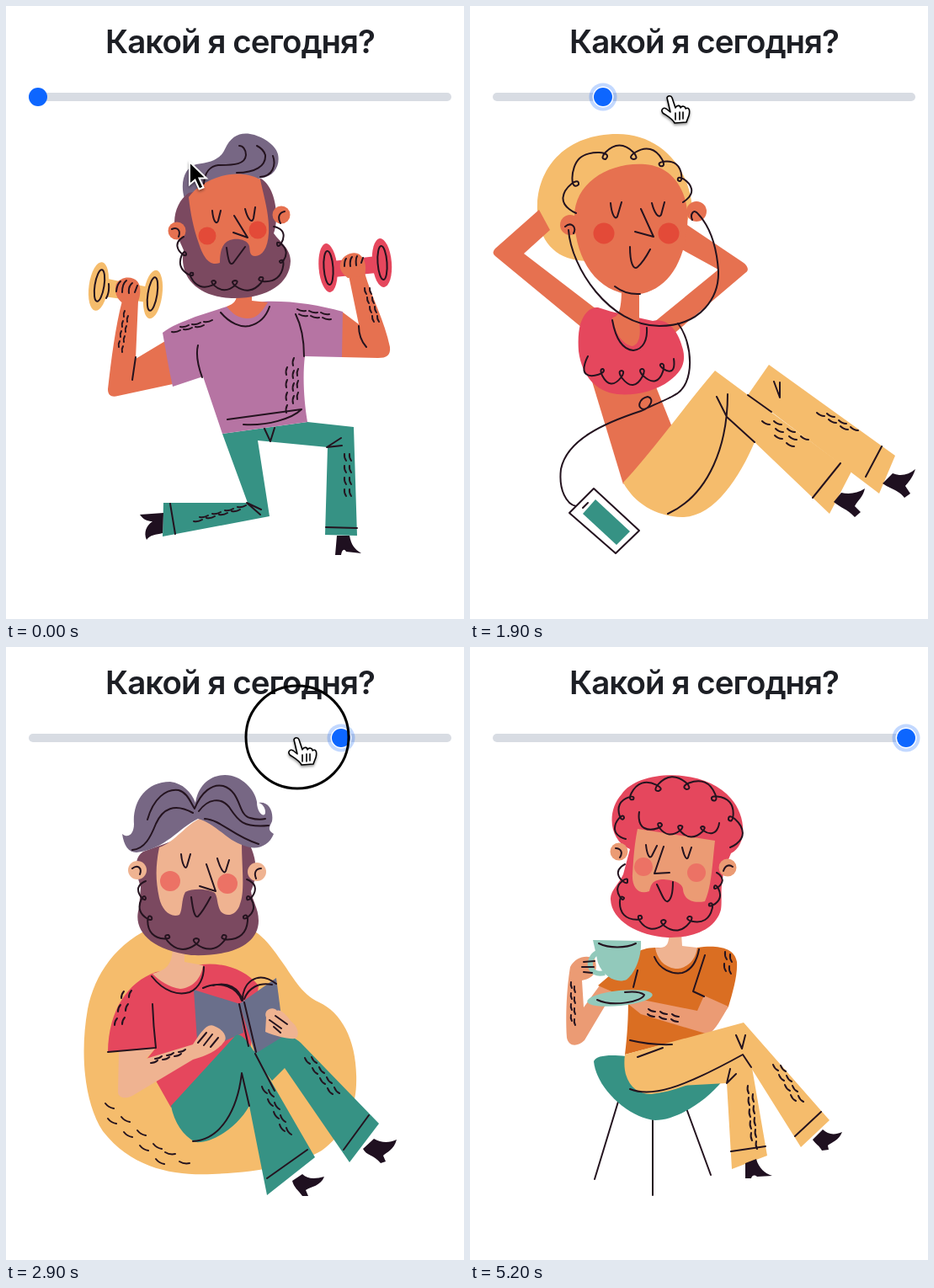
An HTML page that plays this animation: 544x728 px, repeating every 5300 ms.

```html
<!DOCTYPE html>
<html lang="ru">
<head>
<meta charset="utf-8">
<title>Какой я сегодня?</title>
<style>
html, body { margin: 0; width: 100%; height: 100%; overflow: hidden; background: #fff; }
svg { display: block; width: 544px; height: 728px; }
text { font: 600 38.5px Inter, "Open Sans", sans-serif; letter-spacing: -.024em; text-anchor: middle; fill: #1d1f25; }
.line { fill: none; stroke: #24131f; stroke-width: 2; stroke-linecap: round; stroke-linejoin: round; }
#figures g { visibility: hidden; }
#cursor { filter: drop-shadow(0 2px 1.5px rgba(0, 0, 0, .4)); }
</style>
</head>
<body>
<svg viewBox="0 0 544 728">
  <text x="278" y="56">Какой я сегодня?</text>
  <rect x="27" y="103" width="502" height="10" rx="5" fill="#d8dce3"/>
  <g id="knob">
    <g id="focus"><circle r="16.5" fill="#0d66ff" fill-opacity=".25"/><circle r="12.4" fill="#fff"/></g>
    <circle r="11" fill="#0d66ff"/>
  </g>
  <g id="figures"></g>
  <circle id="ring" r="61" fill="none" stroke="#000" stroke-width="3"/>
  <g id="cursor">
    <path id="arrow" d="M0 0V27L6.5 21.500L11.500 32.500L16.500 30.500L11.500 19.500H20Z" stroke="#fff" stroke-width="2"/>
    <g id="hand" stroke="#000" stroke-width="1.6" stroke-linejoin="round" stroke-linecap="round">
      <path fill="#fff" d="M-4 2C-3 -1 1 -1 2 2L6 14C8 10 12 11 12 14C14 11 18 12 18 15C21 13 24 15 22 23C21 26 20 28 19 31L5 32C3 27 -3 24 -9 20C-12 16 -8 13 -5 15L0 19Z"/>
      <path d="M6 20V28M11 19V28M15 19V27"/>
    </g>
  </g>
</svg>
<script>
const red = '#e5475d', yellow = '#f5bc6c', teal = '#369284', mint = '#92c9bb', orange = '#da6e22',
  pink = '#dd7788', lilac = '#b674a3', hair = '#776784', beard = '#7b4960', ginger = '#cb3011',
  tan = '#e67150', pale = '#efb391', peach = '#eb9b74', blush = '#e34a38', rose = '#ec7265',
  slate = '#6a6f8b', ink = '#1f1020';

const shape = (fill, d) => `<path fill="${fill}" d="${d}"/>`;
const line = d => `<path class="line" d="${d}"/>`;
const oval = (x, y, rx, ry, turn, fill) =>
  `<ellipse rx="${rx}" ry="${ry}" transform="translate(${x} ${y}) rotate(${turn})" ${fill ? `fill="${fill}"` : 'class="line"'}/>`;
const dots = (fill, r, ...at) => at.map(([x, y]) => oval(x, y, r, r, 0, fill)).join('');

// Rows of short, slightly bent dashes
function ticks(dx, dy, x, y, sx, sy, n, rx, ry, rows) {
  let d = '';
  for (let r = 0; r < rows; r++) for (let i = 0; i < n; i++)
    d += `M${x + i * sx + r * rx} ${y + i * sy + r * ry}q${dx / 2 - dy * .2} ${dy / 2 + dx * .2} ${dx} ${dy}`;
  return line(d);
}

// Scalloped line with a small loop at every inner point; h sets side and height
function curls(points, h) {
  const p = points.split(',').map(s => s.trim().split(' ').map(Number));
  let d = `M${p[0]}`;
  for (let i = 0; i < p.length - 1; i++) {
    const [[x, y], [u, v]] = [p[i], p[i + 1]], dx = u - x, dy = v - y;
    const mx = (x + u) / 2 + dy * h, my = (y + v) / 2 - dx * h;
    const a = i ? .32 : 0, b = i < p.length - 2 ? .32 : 0;
    d += `C${[x - dx * a, y - dy * a, mx - dx * .35, my - dy * .35, mx, my]}`;
    d += `C${[mx + dx * .35, my + dy * .35, u + dx * b, v + dy * b, u, v]}`;
  }
  return line(d);
}

const lifter = [
  shape(tan, 'M189 398L154 419L157 350L138 350C130 380 125 420 121 455C121 463 126 465 133 463L198 449Z'),
  shape(tan, 'M399 363L419 378L407 320L426 317C434 345 450 375 456 405C457 415 452 418 442 418L398 417Z'),
  shape(yellow, 'M116 323L170 334L168 352L116 345Z'),
  oval(110, 333, 11.5, 29, 8, yellow), oval(174.500, 342.500, 11, 29, 8, yellow),
  shape(red, 'M388 303L440 297L440 317L390 322Z'),
  oval(382.500, 311, 11, 29, -5, red), oval(446.500, 305, 11.5, 29, -5, red),
  oval(111, 332, 5.5, 19, 9), oval(174, 342, 5.5, 20, 9), oval(383, 311, 5.5, 20, -4), oval(447, 305, 5.5, 20, -4),
  shape(tan, 'M131 330C136 321 150 320 156 327C161 333 160 345 156 353L139 353C131 348 128 338 131 330Z'),
  shape(tan, 'M398 303C402 294 415 290 421 296C428 302 428 312 426 321L406 323C397 316 395 310 398 303Z'),
  shape(teal, 'M257 508L358 494L413 500L417 629L379 628L382 524L299 516L313 606L186 630L187 590H287Z'),
  shape(lilac, 'M262 357L225 369C210 375 196 380 186 388C190 410 193 430 198 452L234 440L257 508L358 494C354 470 352 440 355 416L399 417L400 363C370 355 340 350 307 351Z'),
  shape(tan, 'M274 340H292V350L311 352C302 366 296 372 285 371C272 370 267 362 262 357C270 354 275 350 274 340Z'),
  shape(ink, 'M187 602L159 604C163 610 168 612 174 612C167 617 163 625 167 634C171 628 178 628 186 626Z'),
  shape(ink, 'M393 629H408C410 640 414 645 422 650L404 648C402 644 399 645 398 652H391Z'),
  shape(hair, 'M212 229C206 208 213 191 226 188C242 186 254 183 260 170C267 155 277 150 290 152C303 154 320 164 323 176C326 190 318 202 305 204L250 215Z'),
  shape(beard, 'M217 222C202 232 196 255 203 272L211 290C205 320 225 345 268 347C310 348 337 330 338 303C338 288 325 280 318 270C325 250 320 215 303 205Z'),
  shape(tan, 'M217 227C232 206 272 190 302 206C306 226 313 246 312 270C311 288 304 297 296 297C289 297 290 291 289 285C287 278 277 276 270 277C258 279 254 288 254 305C241 310 234 297 229 282C222 262 219 245 217 227Z'),
  dots(tan, 10.5, [203, 267], [327, 248]), dots(blush, 10.5, [239, 273], [299, 266]),
  line('M235 211C236 197 243 190 252 189C272 189 284 188 285 177C285 170 281 166 277 166M274 198C296 198 309 190 308 177Q306 170 298 166M302 203C317 202 321 189 317 178M197 265C203 262 208 266 205 274M331 244C325 245 322 250 326 258'),
  line('M245 243C246 255 250 261 252 255L255 243M284 241C287 253 292 259 294 252L296 239M271 249L287 275L270 269M262 287C264 303 266 309 270 305L284 286'),
  curls('211 274, 214 294, 222 317, 247 326, 272 326, 302 322, 325 303, 322 283, 318 262', -.45),
  line('M255 364C266 377 279 382 289 380C301 377 309 369 313 357M228 403C225 415 229 430 233 441M344 366C351 380 354 398 354 416M263 491L351 479C340 490 310 499 282 497'),
  line('M154 417L150 444M131 339Q132 330 136 327M138 340Q138 330 143 326M146 341Q145 333 150 329M153 340L156 332M122 330Q123 340 119 347M419 380Q419 395 428 405M402 309Q402 302 404 300M409 309Q408 301 411 298M416 308Q415 300 417 297M422 305L424 299'),
  line('M307 502L314 517L319 501M398 513L381 524L399 522M303 598L286 590L302 604M195 591L201 627M380 619L417 620'),
  ticks(10, -2, 197, 387, 14, -3, 3, 10, -6, 2), ticks(10, 2, 346, 360, 14, 2, 3, 2, 6, 2),
  ticks(-1, 9, 342, 418, 0, 15, 4, -8, 11, 2), ticks(-1, 8, 347, 431, 0, 14, 3, 0, 0, 1),
  ticks(-1, 7, 141, 362, -2, 12, 4, 4, 6, 2), ticks(2, 7, 426, 335, 3, 11, 4, 6, 0, 2),
  ticks(10, -2, 223, 612, 15, -4, 4, 7, -5, 2), ticks(2, 8, 402, 532, 0, 14, 4, 6, 0, 2)
];

const listener = [
  shape(yellow, 'M150 302C100 308 78 275 80 235C82 190 115 152 175 152C225 152 260 190 264 240L240 300Z'),
  shape(tan, 'M82 242L30 288Q25 293 30 297L133 382L150 360L64 294L95 266Z'),
  shape(tan, 'M255 258L325 305C330 309 332 314 327 317L240 391L218 376L295 313L246 286Z'),
  shape(tan, 'M145 446L220 450L240 500L182 568Z'),
  shape(yellow, 'M330 462L355 426L505 534L486 579L358 482Z'),
  shape(yellow, 'M182 566C220 525 255 475 291 433L453 553L427 603L338 518C320 560 290 607 252 607C220 606 195 590 182 566Z'),
  shape(red, 'M131 378C135 365 143 357 152 358L168 363L217 374C235 370 247 385 253 408C257 425 250 435 237 445C220 458 195 463 175 461C150 458 133 440 129 410C128 395 129 386 131 378Z'),
  shape(tan, 'M180 336L201 339V376C203 388 202 403 192 404C178 400 172 385 169 370C178 370 180 355 180 336Z'),
  shape(tan, 'M124 250C124 210 165 185 208 188C240 190 262 220 258 262C254 310 230 342 193 343C150 340 124 300 124 250Z'),
  dots(tan, 12, [119, 260], [269, 244]), dots(blush, 12.5, [159, 270], [236, 270]),
  curls('126 246, 129 212, 161 182, 194 182, 226 190, 247 207, 253 233', .5),
  line('M167 234C168 246 172 255 175 250L180 233M216 234C219 246 224 253 227 248L231 233M203 241L218 274L196 268M190 286C190 305 194 314 199 310Q206 304 214 289M172 333Q185 343 202 342'),
  line('M113 262C120 256 127 262 123 270M117 266C120 310 165 380 225 380C275 380 296 345 295 315C293 285 285 262 271 247C266 240 261 247 264 254'),
  line('M169 373C173 395 181 408 194 409C206 408 211 396 210 382'),
  curls('140 416, 158 431, 180 433, 204 431, 227 425, 242 419', -.75),
  line('M247 377C265 400 268 450 243 462C235 467 215 475 207 479C197 478 201 466 211 464C220 466 214 478 203 481C160 495 115 515 108 550C105 575 115 592 126 594'),
  '<path class="line" style="fill:#fff" d="M147 573L201 623L173 650L118 602Z"/>',
  shape(teal, 'M149 586L190 624L174 640L134 603Z'),
  line('M134 596L140 590M330 462L358 482M361 446L368 465V447M293 464L305 488L338 518M306 461C306 520 285 580 235 603M440 543L407 584M489 523L470 559'),
  ticks(9, 4, 347, 493, 16, 9, 3, 14, 0, 2), ticks(9, 4, 362, 510, 14, 9, 2, 0, 0, 1),
  ticks(9, 4, 412, 483, 14, 8, 3, 12, 1, 2),
  shape(ink, 'M432 589L441 578C450 580 460 579 469 573C467 583 460 588 457 594L464 601L457 607C448 597 440 596 432 589Z'),
  shape(ink, 'M490 567L502 555C511 559 521 557 529 550C525 562 520 566 517 570L523 579L516 584C508 574 498 573 490 567Z')
];

const catLover = [
  shape(ginger, 'M143 360C120 368 70 362 40 342C30 335 34 322 42 318C52 300 56 290 53 275C42 240 52 195 85 172C115 148 165 145 200 160C238 178 260 205 263 238L255 262L140 310Z'),
  shape(mint, 'M128 373C110 368 95 370 88 384C75 400 82 440 96 473L104 490C115 520 138 552 163 573L254 482L222 452L232 420C220 400 205 377 186 375L160 374Z'),
  shape(pale, 'M140 338L163 352L161 375L167 378C163 398 152 404 143 400C133 394 130 382 127 374C136 374 140 366 140 338Z'),
  shape(pale, 'M108 262C112 245 125 243 135 250C165 240 205 232 235 208C245 218 256 235 256 262C256 305 235 352 205 364C180 370 145 345 125 322C110 300 105 280 108 262Z'),
  dots(pale, 13, [105, 283], [269, 252]), dots(rose, 14, [149, 290], [234, 283]),
  shape('#e56d63', 'M180 318C184 306 190 304 196 310C202 303 209 304 212 320C210 335 203 339 194 339C186 337 181 330 180 318Z'),
  line('M96 282C103 276 111 280 108 290M273 246C266 248 263 254 267 262M157 247C158 260 162 270 165 265Q169 258 170 248M209 242C212 255 217 264 220 259Q224 252 224 242M195 254L215 290L189 287M175 306C182 325 190 333 196 331C203 327 208 316 211 306M148 343Q156 355 168 357'),
  line('M104 174Q89 189 89 207M120 166Q128 185 122 205M136 162Q154 177 154 203M138 156C160 153 178 163 190 178M214 181C228 188 235 200 231 210M53 281C50 296 44 308 38 318'),
  curls('97 219, 127 234, 164 222, 197 216, 231 210', -.5),
  curls('38 318, 54 328, 85 344, 117 344, 143 359', -.5),
  shape(pale, 'M221 436L260 425L296 404C302 406 298 414 290 418L245 452L231 458Z'),
  shape(pink, 'M370 520L380 458L503 529L470 586Z'),
  shape(orange, 'M290 396C320 392 345 400 360 415C378 433 382 460 378 480C374 500 370 520 362 532L282 480L265 460C252 452 260 440 270 428L250 435C244 415 256 397 290 396Z'),
  shape(orange, 'M360 535C380 520 385 495 386 475C390 450 412 441 430 445C444 448 452 460 452 470C438 472 425 462 412 468C405 490 395 525 380 540C374 546 366 543 360 535Z'),
  shape(orange, 'M288 295L304 333C315 336 328 336 337 332L364 316C363 340 358 365 345 380C335 396 305 402 285 394C270 388 266 370 267 350C270 325 280 310 288 295Z'),
  shape(yellow, 'M267 358C275 346 290 348 298 360C303 372 325 378 328 392C315 399 295 399 283 392C272 384 267 370 267 358Z'),
  shape(pink, 'M163 573L255 461L455 591L420 652L297 547C283 567 270 590 250 600C220 608 185 590 163 573Z'),
  shape(pale, 'M103 470L157 453L148 483L240 456L264 466L158 511C150 514 146 512 142 507Z'),
  shape(pale, 'M240 456C262 450 285 440 305 428C315 420 335 420 328 426L318 433L345 430C354 432 350 440 340 441L352 443C357 449 350 451 340 451L346 457C346 462 338 463 330 461C328 468 318 470 310 468C290 472 275 463 255 467Z'),
  line('M138 409L158 453L97 472C87 445 78 415 84 392M194 390C205 403 212 420 222 440M232 458L262 451'),
  line('M360 411L336 426L365 427M378 444L352 460L379 467M376 488L345 485L364 516M279 329L287 312L294 332M340 334L362 320L356 345M282 344C281 352 284 360 287 356L292 347M316 351C318 358 322 366 325 361L330 350M283 363L295 362L289 368L291 383M279 372C281 382 287 387 291 383C296 386 299 380 299 372M247 424L251 416M249 431L256 419M261 452L267 445M266 460L273 449M309 446L325 444M310 456L323 457'),
  line('M163 574C190 595 230 600 245 588C262 570 268 545 268 523L297 546M262 497L269 519L276 493M441 584L402 629M484 519L452 572'),
  ticks(0, 8, 95, 387, -2, 15, 4, 7, 7, 2), ticks(7, 7, 115, 505, 12, 12, 4, 16, 0, 2),
  ticks(8, 5, 318, 525, 13, 11, 4, 15, -1, 2), ticks(8, 5, 385, 476, 14, 11, 4, 14, 0, 2),
  shape(ink, 'M432 630L441 620C452 626 463 623 474 614C471 626 465 632 460 636L463 644L457 652C448 640 440 640 432 630Z'),
  shape(ink, 'M479 568L488 557C499 562 510 558 522 548C519 560 513 566 508 571L513 579L507 586C498 575 488 576 479 568Z')
];

const reader = [
  shape(yellow, 'M180 330C130 350 105 390 97 430C88 480 92 540 115 575C150 620 200 628 245 626C300 624 345 615 375 598C400 580 415 550 416 520C418 470 400 435 372 422C350 412 340 390 325 370C305 340 290 330 260 325Z'),
  shape(red, 'M178 386C145 398 122 430 121 481L178 476L165 492L196 547L290 480L300 402C285 384 260 374 232 377Z'),
  shape(pale, 'M198 355H212V374L234 378C232 395 220 405 207 406C193 404 182 396 174 388C188 384 198 380 198 355Z'),
  shape(teal, 'M290 482L330 462C338 462 345 465 350 470L443 566L408 612L331 500L316 515Z'),
  shape(slate, 'M223 407L278 424L282 458L228 482Z'),
  shape(slate, 'M277 424L321 393L330 462L296 483Z'),
  shape(teal, 'M196 545L272 462Q280 455 296 483L367 606L310 651L289 545C275 570 245 590 225 588C210 580 200 565 196 545Z'),
  shape(pale, 'M134 481L178 476L166 489L222 472C230 460 238 446 247 450C260 455 264 465 258 470C250 482 230 488 222 490L150 533C142 537 133 536 133 528Z'),
  shape(pale, 'M308 457L309 440C305 430 318 426 322 432C325 430 332 435 338 444C346 450 350 460 344 465C335 466 320 462 308 457Z'),
  shape(beard, 'M163 243C152 250 153 265 160 285L158 310C150 335 170 360 220 366C270 368 300 352 300 325C300 310 292 300 291 290C300 270 297 250 290 236L240 215Z'),
  shape(pale, 'M182 238C200 232 215 210 230 204C245 205 262 225 280 234C280 260 284 290 278 305C275 318 262 322 255 314C250 305 252 298 248 292C240 287 222 286 213 291C208 300 210 312 206 318C195 322 185 312 182 298C177 275 178 258 182 238Z'),
  shape(hair, 'M155 244C145 244 140 235 138 222C145 228 152 222 152 210C150 185 165 160 195 160C210 162 220 172 225 185C228 165 242 152 260 152C280 152 296 170 298 184C298 198 308 204 308 196C308 190 304 186 300 185C312 183 318 195 316 207C313 214 310 217 318 222C312 237 297 242 283 236C262 230 250 210 228 204C205 215 190 240 155 244Z'),
  line('M150 241C165 240 172 225 178 210C186 192 200 185 222 197M168 205C175 180 190 168 205 170C215 173 218 182 224 192C232 172 245 162 258 165C280 172 275 200 290 203Q300 206 308 204M229 195C240 180 255 178 265 190C275 205 280 215 312 212M236 204C255 205 270 225 300 234'),
  dots(pale, 11, [156, 265], [298, 267]), dots(rose, 12, [195, 278], [263, 281]),
  line('M150 263C156 258 162 262 159 270M303 263C297 263 294 268 297 275M208 246C209 257 213 266 215 260L219 246M251 251C254 262 259 271 261 266L265 253M238 258L249 290L230 284M220 297C222 312 224 322 228 320Q234 314 243 297'),
  curls('166 278, 166 298, 173 321, 193 342, 226 346, 258 342, 282 320, 286 298, 286 276', -.45),
  line('M173 391C188 410 205 414 218 410C230 405 235 392 235 380M174 424Q175 450 178 476L121 481M234 405C255 395 275 405 280 420M246 402C263 397 277 405 281 420C280 400 298 382 321 400M283 418C288 405 300 398 316 401M277 424L288 474M283 422L297 481'),
  line('M228 470L238 458M235 473L245 460M243 475L252 464M313 443L327 453M320 438L334 448M318 451L326 458'),
  line('M222 587C255 585 275 550 280 506L289 545M296 483L319 527M310 631L358 597M401 597L431 556'),
  ticks(-3, 8, 140, 409, -4, 16, 3, 9, -1, 2), ticks(8, -3, 172, 494, 14, -4, 3, 5, -5, 2),
  ticks(6, 8, 304, 522, 7, 15, 4, 8, 4, 2), ticks(6, 7, 355, 488, 9, 12, 4, 8, -1, 2),
  ticks(10, 6, 118, 542, 19, 16, 4, 3, 18, 2), ticks(12, 2, 189, 600, 17, 11, 2, 0, 0, 1),
  shape(ink, 'M340 634L352 626C358 632 367 632 378 629C374 640 362 641 356 645L359 652H352C347 645 342 642 340 634Z'),
  shape(ink, 'M424 596L437 584C446 589 455 589 464 585C461 597 452 600 448 604L451 611L445 613C437 603 428 604 424 596Z')
];

const drinker = [
  line('M176 540L148 632M217 562V651M257 548L286 627'),
  shape(teal, 'M147 492C150 485 165 484 185 486L300 515C280 540 245 562 220 562C190 560 150 525 147 492Z'),
  shape(peach, 'M154 402L170 410L136 467C128 475 117 475 115 464C113 430 116 398 119 380C125 369 137 365 148 370C152 382 150 393 133 396L135 428Z'),
  shape(orange, 'M220 357C200 357 190 368 180 378L152 402L188 418C188 440 187 460 184 484C220 474 250 468 284 460L307 427C312 410 318 390 317 374C314 355 290 354 270 357Z'),
  shape(pale, 'M236 340H251L252 355L270 357C268 372 258 382 244 382C230 380 222 370 220 357C232 358 237 355 236 340Z'),
  shape(peach, 'M307 427L278 414L270 432L205 419L188 424L203 436L283 460C292 455 299 440 307 427Z'),
  shape(yellow, 'M250 521L323 484L335 500L353 604L311 620L305 518Z'),
  shape(yellow, 'M184 484L325 446L427 562L393 594L324 484C290 508 250 528 215 531C195 531 180 515 184 484Z'),
  '<path d="M151 363C138 370 140 392 160 387" fill="none" stroke="' + mint + '" stroke-width="6"/>',
  shape(mint, 'M146 348L203 349C204 365 198 385 186 395C175 400 158 392 152 375Z'),
  oval(178, 417, 39, 9, -6, mint),
  shape(red, 'M190 240C165 230 162 195 180 175C200 145 280 143 310 180C328 200 330 235 310 245L303 262C296 285 300 300 298 312C292 335 265 346 235 345C200 343 168 325 167 300C166 290 178 280 182 270Z'),
  shape(peach, 'M199 216L291 230C288 255 287 285 279 302C265 305 254 300 253 288C253 280 240 276 228 276C215 277 215 284 213 290C200 295 192 285 193 270C194 250 196 230 199 216Z'),
  dots(peach, 10.5, [177, 243], [306, 262]), dots(rose, 11, [206, 261], [269, 268]),
  curls('185 228, 183 203, 194 181, 224 171, 257 169, 288 182, 307 205, 309 238', .48),
  curls('201 196, 226 209, 250 212, 276 213, 296 209', -.5),
  curls('184 258, 187 278, 183 298, 203 319, 230 324, 260 320, 284 305, 290 285, 293 268', -.48),
  line('M173 239C179 239 182 244 178 250M301 266C303 259 308 258 312 261M209 235C210 245 213 253 216 248L222 236M252 238C254 247 257 254 259 250L263 238M230 237L219 269L237 268M222 282C227 292 231 304 235 302C240 299 241 290 241 279'),
  line('M219 368C225 383 240 389 252 387C265 383 270 370 272 359M279 366L265 409L278 415M199 384L194 404M190 467Q215 473 240 472M199 487L229 476M153 352C165 358 185 358 197 352M151 419C170 428 205 421 207 413Q200 408 184 410M135 374L148 373M133 380L147 380M135 386L145 387'),
  line('M190 525C215 535 250 525 324 484L334 499M316 461L323 477L327 461M316 507L305 518L309 501M310 599L351 593M386 581L417 552'),
  ticks(1, 7, 120, 398, 0, 13, 4, 4, 5, 2), ticks(8, 3, 212, 430, 14, 3, 3, -1, 6, 2),
  ticks(2, 9, 303, 362, -1, 14, 2, 6, 3, 2), ticks(1, 9, 330, 521, 1, 14, 5, 6, 10, 2),
  ticks(6, 7, 360, 496, 7, 12, 4, 9, 1, 2),
  shape(ink, 'M327 613L340 608C343 619 350 625 359 628L341 629C337 626 335 628 334 631H327Z'),
  shape(ink, 'M407 585L419 573C425 579 433 580 442 576C438 586 430 588 425 592L426 597L418 598C415 592 410 590 407 585Z')
];

const $ = id => document.getElementById(id);
$('figures').innerHTML = [lifter, listener, catLover, reader, drinker].map(f => `<g>${f.join('')}</g>`).join('');
const figures = [...$('figures').children];

const LOOP = 5300, STEP = 100;
const clicks = [1000, 2000, 2800, 3900];
// time, x, y of the pointer
const path = [
  [0, 218, 185], [200, 218, 185], [800, 108, 108], [1200, 108, 108], [1640, 238, 107], [2300, 238, 107],
  [2700, 346, 108], [3100, 346, 108], [3700, 508, 109], [4300, 508, 109], [4700, 500, -40], [LOOP, 500, -40]
];

function pointer(t) {
  const i = path.findIndex(k => k[0] > t), [t0, x0, y0] = path[i - 1], [t1, x1, y1] = path[i];
  const u = (t - t0) / (t1 - t0), e = u * u * (3 - 2 * u);
  return [x0 + (x1 - x0) * e, y0 + (y1 - y0) * e];
}

const show = (el, on) => { el.style.visibility = on ? 'visible' : 'hidden'; };
const move = (el, x, y) => el.setAttribute('transform', `translate(${x} ${y})`);

function draw(t) {
  const value = clicks.filter(c => t >= c + STEP).length;
  const [x, y] = pointer(t), over = y > 96 && y < 120;
  figures.forEach((f, i) => show(f, i === value));
  move($('knob'), 38 + 120 * value, 108);
  show($('focus'), t >= clicks[0]);
  move($('cursor'), x, y);
  show($('hand'), over);
  show($('arrow'), !over);
  move($('ring'), x, y - 1);
  show($('ring'), clicks.some(c => t >= c && t < c + 3 * STEP));
}

const start = performance.now();
function tick() {
  const t = (performance.now() - start) % LOOP;
  draw(Math.floor(t / STEP) * STEP);
  requestAnimationFrame(tick);
}
tick();
</script>
</body>
</html>
```
